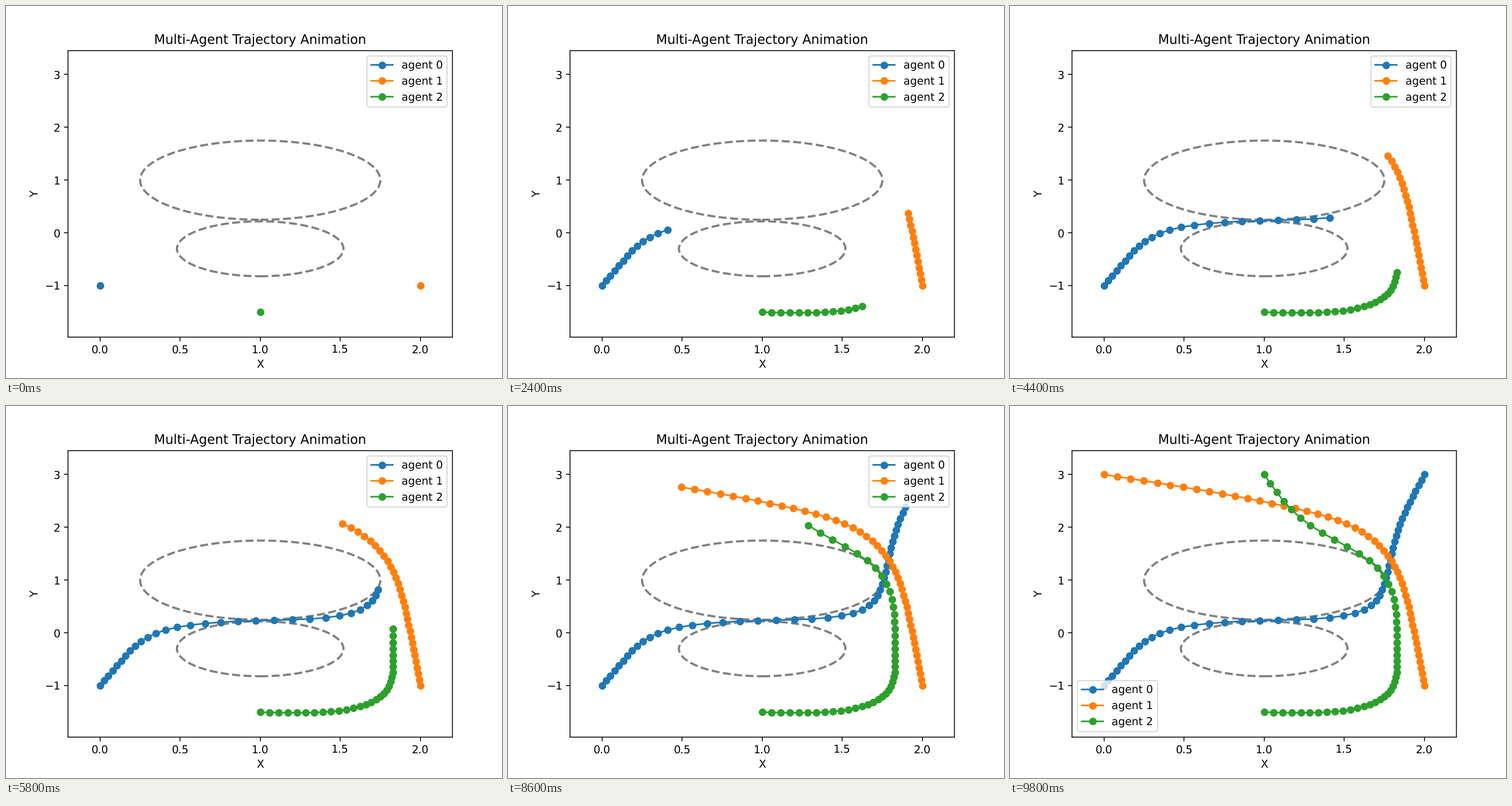
Recreate the animation shown at these times as a matplotlib script. Size 864 px wide and 648 px high, loop 10000 ms.

```python
import numpy as np
import matplotlib.pyplot as plt
from matplotlib.animation import FuncAnimation

# Soft, unsnapped strokes and unhinted text
plt.rcParams.update({"path.snap": False, "text.hinting": "none"})

STEPS = 50

# Key points of each agent: (step, x, y)
ROUTES = [
    [(0, 0, -1), (6, .16, -.43), (12, .409, .056), (18, .972, .233),
     (22, 1.408, .288), (25, 1.624, .44), (29, 1.737, .821),
     (37, 1.813, 1.73), (49, 2, 3)],
    [(0, 2, -1), (12, 1.911, .375), (22, 1.773, 1.463), (29, 1.515, 2.067),
     (35, 1.122, 2.407), (49, 0, 3)],
    [(0, 1, -1.5), (8, 1.443, -1.488), (14, 1.694, -1.312),
     (20, 1.8145, -.925), (28, 1.827, -.055), (35, 1.775, .93),
     (38, 1.655, 1.371), (43, 1.2885, 2.037), (49, 1, 3)],
]


def trajectory(route):
    """Natural cubic spline through the key points, one row per step."""
    keys = np.array(route, float)
    t = keys[:, 0] / (STEPS - 1)
    s = np.linspace(0, 1, STEPS)

    def basis(u):
        return np.abs(u[:, None] - t) ** 3, np.column_stack([np.ones_like(u), u])

    cubic, linear = basis(t)
    system = np.block([[cubic, linear], [linear.T, np.zeros((2, 2))]])
    weights = np.linalg.solve(system, np.vstack([keys[:, 1:], np.zeros((2, 2))]))
    return np.hstack(basis(s)) @ weights


def legend_corner(step):
    """Corner least covered by the paths drawn so far."""
    if step < 44:
        return "upper right"
    return "upper left" if step < 47 else "lower left"


paths = [trajectory(r) for r in ROUTES]

fig, ax = plt.subplots(figsize=(6.4, 4.8), dpi=135)
ax.set_xlim(-0.2, 2.2)
ax.set_ylim(-1.9725, 3.4525)
ax.set_xlabel("X")
ax.set_ylabel("Y")
ax.set_title("Multi-Agent Trajectory Animation")

for center, radius in (((1, 1), 0.75), ((1, -0.3), 0.52)):
    ax.add_patch(plt.Circle(center, radius, fill=False, color="gray",
                            linestyle="--", linewidth=2))

lines = [ax.plot([], [], "o-", label=f"agent {i}")[0] for i in range(len(paths))]
legend = ax.legend(loc="upper right")


def update(step):
    for line, path in zip(lines, paths):
        line.set_data(*path[:step + 1].T)
    legend.set_loc(legend_corner(step))
    return [*lines, legend]


anim = FuncAnimation(fig, update, frames=STEPS, init_func=lambda: update(0),
                     interval=200, repeat=True, repeat_delay=0)
plt.show()
```
